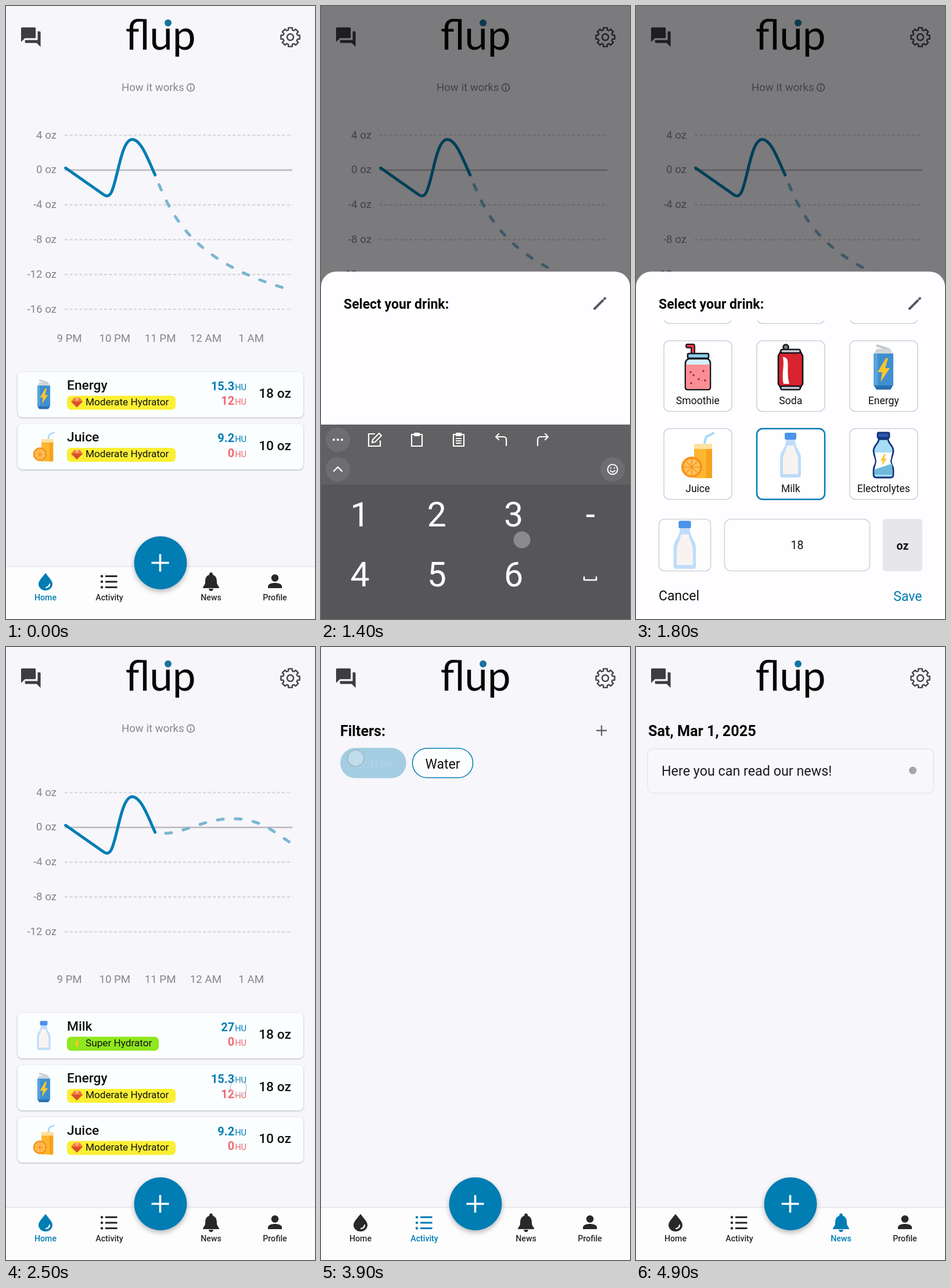
An HTML page that plays this animation: 532 by 1053 pixels, repeating every 5000 ms.

```html
<!DOCTYPE html>
<html lang="en">
<head>
<meta charset="utf-8">
<title>Hydration tracker</title>
<style>
  html, body { margin: 0; width: 100%; height: 100%; overflow: hidden; background: #f7f6fa; }
  svg { display: block; font-family: Roboto, Arial, sans-serif; }
  .shadow { filter: drop-shadow(0 1px 1.5px #0004); }
  .faint { filter: drop-shadow(0 .5px 1px #0003); }
  .lift { filter: drop-shadow(0 4px 4px #0004); }
  .ink { stroke: #15171c; stroke-width: 2.6; stroke-linejoin: round; stroke-linecap: round; }
  .line { fill: none; stroke-linecap: round; stroke-linejoin: round; }
</style>
</head>
<body>
<svg id="stage" width="532" height="1053" viewBox="0 0 532 1053"></svg>
<script>
const BLUE = '#007db3', DARK = '#28282b', GREY = '#858488', RED = '#f0696f';

// SVG helpers
const path = (d, fill, more = '') => `<path d="${d}" fill="${fill}" ${more}/>`;
const line = (d, color, w, more = '') => `<path class="line" d="${d}" stroke="${color}" stroke-width="${w}" ${more}/>`;
const rect = (x, y, w, h, r, fill, more = '') =>
  `<rect x="${x}" y="${y}" width="${w}" height="${h}" rx="${r}" fill="${fill}" ${more}/>`;
const circle = (x, y, r, fill, more = '') => `<circle cx="${x}" cy="${y}" r="${r}" fill="${fill}" ${more}/>`;
const oval = (x, y, rx, ry, fill) => `<ellipse cx="${x}" cy="${y}" rx="${rx}" ry="${ry}" fill="${fill}"/>`;
const text = (x, y, s, size, fill = '#111', more = '') =>
  `<text x="${x}" y="${y}" font-size="${size}" fill="${fill}" ${more}>${s}</text>`;
const at = (x, y, inner, scale = 1, more = '') =>
  `<g transform="translate(${x} ${y}) scale(${scale})" ${more}>${inner}</g>`;
const clip = (x, y, w, h, inner) =>
  `<svg x="${x}" y="${y}" width="${w}" height="${h}" viewBox="${x} ${y} ${w} ${h}">${inner}</svg>`;
const MID = 'text-anchor="middle"', END = 'text-anchor="end"', BOLD = 'font-weight="700"', MEDIUM = 'font-weight="500"';
const INK = 'class="ink"';

// Drink pictures, each about 80 px tall around (0, 0)
const steam = [-9, 0, 9].map(x => line(`M${x} -20c-5 -6 4 -9 0 -17`, '#dcdbe0', 2.2)).join('');
const bolt = path('M4 -16L-10 8H-2L-5 25L11 1H3L8 -16Z', '#fcc52c');
const drinks = {
  Water:
    path('M1 -12H30L25 38H6Z', '#d9f1fd', INK) + path('M3 0H28L24 37H7Z', '#6ab8ec') +
    path('M-19 -29h11c0 6 12 8 12 16v45q0 7 -7 7h-20q-7 0 -7 -7v-45c0 -8 11 -10 11 -16z', '#a9dcf8', INK) +
    rect(-29, -6, 32, 19, 0, '#6ab8ec') + line('M-29 -6H-8M-29 3H3M-29 13H3M-29 23H-10', '#15171c', 2.4) +
    rect(-22, -39, 17, 9, 2, '#3d93d6', INK),
  Coffee:
    steam + oval(-1, 30, 37, 9, '#a58c70') + oval(-2, 27, 25, 6, '#8a7055') +
    line('M22 -2C46 -10 41 18 14 20', '#cfc8bb', 5) +
    path('M-31 -7C-31 15 -22 27 -13 30H7C17 27 25 15 25 -7Z', '#dcd7cd') +
    oval(-3, -8, 28, 8, '#ebe7df') + oval(-3, -7, 24, 6, '#49382f'),
  Tea:
    at(-4, 0, steam, 1.15) + rect(-32, 31, 56, 7, 3.5, '#cc6d37') +
    line('M19 -8C42 -12 36 17 14 15', '#e38a48', 4.5) +
    path('M-32 -12H21C21 13 14 30 2 31H-13C-25 30 -32 13 -32 -12Z', '#fdebd2') +
    rect(-32, -14, 53, 5, 2.5, '#f3cfa3') + line('M-13 -11V9', '#c98c51', 1.6) + path('M-20 12l7 -5l7 5v13h-14z', '#f6a428'),
  Smoothie:
    line('M-17 -37H-8V-19', '#15171c', 8) + line('M-17 -37H-8V-19', '#e4353f', 4) +
    path('M-15 -15H17Q22 -13 22 -7V34q0 4 -4 4H-17q-4 0 -4 -4V-7Q-21 -13 -15 -15Z', '#d5eefb', INK) +
    path('M-20 -5H21V33q0 4 -4 4H-16q-4 0 -4 -4Z', '#fb8d94') + rect(-17, -24, 36, 8, 2, '#8ccdf0', INK) +
    [[-12, 8], [-7, 13], [10, 6], [13, 22], [-11, 27], [2, 20]].map(p => circle(...p, 1.7, '#8d2638')).join(''),
  Soda:
    circle(-8, -35, 4.5, '#777', INK) +
    path('M-16 -29H16L21 -20V28L16 36H-16L-21 28V-20Z', '#d9232e', INK) +
    path('M-13 -18C2 -18 -9 5 -2 28H-12C-16 10 -10 0 -13 -18Z', '#fff') +
    rect(-17, -31, 34, 6, 3, '#c9ced6', INK) + rect(-17, 32, 34, 6, 3, '#c9ced6', INK),
  Energy:
    path('M-12 -38L10 -31', 'none', 'stroke="#c3c7cc" stroke-width="4"') + path('M-12 -32H12L17 -22H-17Z', '#d0d4d9') +
    path('M-17 -24H17V30L12 38H-12L-17 30Z', '#3f8fd1') + rect(-17, -24, 7, 54, 0, '#58a4de') +
    path('M-16 31H16L12 38H-12Z', '#2a6fae') + bolt,
  Juice:
    line('M12 -22L15 -32L27 -38', '#a5d8f8', 4) + rect(-6, -20, 31, 59, 2, '#fdb62f') +
    rect(-6, -20, 31, 9, 2, '#ffe0a0') + rect(15, -11, 10, 50, 0, '#f5a31d') + circle(-10, 20, 18, '#f7941e') +
    circle(-10, 20, 14, '#ffc25c') + line('M-24 20H4M-10 6V34M-20 10L0 30M0 10L-20 30', '#f7941e', 1.6),
  Milk:
    path('M-8 -27H8C8 -10 18 -10 18 6V34q0 4 -4 4H-14q-4 0 -4 -4V6C-18 -10 -8 -10 -8 -27Z', '#bfdcfa') +
    path('M-6 -17H6C8 -5 13 -2 13 8V32H-13V8C-13 -2 -8 -5 -6 -17Z', '#f8f3f1') +
    rect(-10, -39, 20, 12, 3, '#4b93ea'),
  Electrolytes:
    `<g stroke="#16347c" stroke-width="2.8">` +
    path('M-8 -28H8C8 -20 17 -18 17 -8C17 0 13 4 13 10C13 16 17 18 17 25V33q0 5 -5 5H-12q-5 0 -5 -5V25C-17 18 -13 16 -13 10C-13 4 -17 0 -17 -8C-17 -18 -8 -20 -8 -28Z', '#a6dcf5') +
    rect(-10, -39, 20, 9, 2, '#2b57ad') + '</g>' + path('M-15 -5H15L12 10L15 24H-15L-12 10Z', '#fff') +
    path('M-15 24L15 14V33H-15Z', '#6fb8dc') + at(0, 5, bolt, .5),
};

function gear() {
  const pts = [];
  for (let i = 0; i < 8; i++)
    for (const [da, r] of [[-.27, 12.8], [-.2, 16.4], [.2, 16.4], [.27, 12.8]]) {
      const a = i * Math.PI / 4 + da;
      pts.push(`${(r * Math.sin(a)).toFixed(1)} ${(-r * Math.cos(a)).toFixed(1)}`);
    }
  return line(`M${pts.join('L')}Z`, '#454548', 2.4) + circle(0, 0, 5.5, 'none', 'stroke="#454548" stroke-width="2.4"');
}

const header =
  at(22.6, 33.3, path('M21 6h-2v9H6v2c0 .55.45 1 1 1h11l4 4V7c0-.55-.45-1-1-1zM17 12V3c0-.55-.45-1-1-1H3c-.55 0-1 .45-1 1v14l4-4h10c.55 0 1-.45 1-1z', '#3d3d40'), 1.68) +
  text(266, 75, 'flup', 71, '#050505', `${MID} style="font-family:Lato,sans-serif"`) +
  circle(279, 29, 6, '#16759f') + at(489.5, 53.5, gear());

const navIcons = {
  Home: [68, c => path('M0 -15C6 -7 12 -2 12 4A12 11 0 0 1 -12 4C-12 -2 -6 -7 0 -15Z', c) + line('M1 10Q7 9 7 4', '#fff', 2.2)],
  Activity: [178, c => [-9.5, 0, 9.5].map(y => circle(-13, y, 2.2, c) + rect(-7, y - 1.5, 20.5, 3, 0, c)).join('')],
  News: [353, c => path('M0 -16q3 0 3 4C9 -10 10 -5 10 1C10 6 14 7 14 11H-14C-14 7 -10 6 -10 1C-10 -5 -9 -10 -3 -12q0 -4 3 -4ZM-4 12H4Q3 16 0 16Q-3 16 -4 12Z', c)],
  Profile: [463, c => circle(0, -6.5, 6.3, c) + path('M-12 11V8C-12 0 12 0 12 8V11Z', c)],
};

const nav = active =>
  rect(0, 963, 532, 90, 0, '#fdfdfe') + rect(0, 962, 532, 1.5, 0, '#e4e3e7') +
  Object.entries(navIcons).map(([name, [x, icon]]) => {
    const c = name === active ? BLUE : DARK;
    return at(x, 989, icon(c)) + text(x, 1021, name, 14.2, c, `${MID} ${MEDIUM}`);
  }).join('') +
  circle(266, 956.5, 45.4, BLUE, 'class="lift"') + path('M250.5 956.5H280.5M265.5 941.5V971.5', 'none', 'stroke="#fff" stroke-width="3.6"');

// Chart: first grid line, number of lines, measured curve, forecast curve, dash start
const hump = 'M0 0L65 45.5Q74 52 79 41C90 17 96 -49 114.5 -49C129.5 -49 141 -17 154 12';
const decline = 'M0 0L6 4L77 56C107 77 132 91 154 104';
const charts = {
  start: [222, 6, hump, 'M257 290C285 365 325 440 484 486', 18],
  added: [250, 5, hump, 'M257 318C300 330 345 285 413 297C450 303 470 325 496 340', 18],
  final: [250, 5, decline, 'M276 411C310 405 345 339 413 339C450 339 470 361 496 377', 0],
};

function chart([top, rows, past, future, gap]) {
  let s = '';
  for (let i = 0; i < rows; i++) {
    const y = top + i * 59.8;
    s += text(87, y + 5.5, `${4 - 4 * i} oz`, 18.7, GREY, END) +
      (i === 1 ? rect(101, y - 1.2, 392, 2.6, 0, '#bbbabe')
        : path(`M101 ${y}H493`, 'none', 'stroke="#d9d8dc" stroke-width="2.6" stroke-dasharray="5 3.5"'));
  }
  ['9 PM', '10 PM', '11 PM', '12 AM', '1 AM'].forEach((h, i) => s += text(109 + i * 78.3, 577, h, 18.7, GREY, MID));
  return s + at(102.7, top + 56.3, line(past, BLUE, 5)) +
    clip(0, 200, 494, 340, line(future, '#7ab6d1', 5, `stroke-dasharray="10 20.8" stroke-dashoffset="${-gap}"`));
}

const entries = {
  Energy: ['15.3', '12', 18], Juice: ['9.2', '0', 10], Milk: ['27', '0', 18],
};

function card(name, row, dx = 0) {
  const [gain, loss, oz] = entries[name], superb = name === 'Milk';
  const units = (n, y, c) =>
    text(414, y, `<tspan ${BOLD} font-size="20">${n}</tspan><tspan dx="1">HU</tspan>`, 14.6, c, END);
  const gem = superb ? at(122, 51, bolt, .42)
    : path('M112 51L118 44H127L132 51L122 61Z', '#f47b34') + path('M112 51H132L122 61Z', '#d94f2b') + path('M118 44H127L122 51Z', '#ffae72');
  return at(dx, 628.5 + row * 89.5,
    rect(20, 0, 492, 78, 8, '#fafeff', 'class="shadow"') + at(65, 39, drinks[name], .65) +
    text(105, 30, name, 22.8, '#111', MEDIUM) +
    rect(105, 41, superb ? 158 : 187, 24, 7, superb ? '#8fe71d' : '#faef34') + gem +
    text(137, 57, superb ? 'Super Hydrator' : 'Moderate Hydrator', 17.2) +
    units(gain, 31, BLUE) + units(loss, 56.5, RED) + text(491, 44.5, `${oz} oz`, 22.8, '#111', `${MEDIUM} ${END}`));
}

function home(t) {
  let cards;
  if (t < 2200) cards = card('Energy', 0) + card('Juice', 1);
  else {
    const swipe = t < 2600 ? 0 : -60 * ((t - 2500) / 100) ** 2;
    const rise = Math.min(1, Math.max(0, (t - 2800) / 200));
    cards = card('Milk', 0) + (t < 2900 ? card('Energy', 1, swipe) : '') + card('Juice', 2 - rise);
  }
  return text(199, 146, 'How it works', 18.6, '#88878b') +
    circle(318, 140, 6.4, 'none', 'stroke="#77767a" stroke-width="1.5"') + path('M318 139V144M318 136V137.6', 'none', 'stroke="#77767a" stroke-width="1.6"') +
    chart(charts[t < 2200 ? 'start' : t < 3100 ? 'added' : 'final']) + clip(17, 620, 498, 320, cards) + nav('Home');
}

function activity(t) {
  const pill = (x, w, name, on, opacity = 1) =>
    rect(x, 174, w, 50.5, 25, on ? BLUE : '#fcfdfe', `stroke="${BLUE}" stroke-width="1.5" opacity="${opacity}"`) +
    text(x + w / 2, 208.5, name, 23, on ? '#fff' : '#111', `${MID} opacity="${opacity ** 2}"`);
  return text(33, 153, 'Filters:', 25, '#050505', BOLD) +
    path('M474 143.5H492M483 134.5V152.5', 'none', 'stroke="#66656a" stroke-width="2.3"') +
    pill(34, 112, 'Coffee', t >= 3900, t === 3900 ? .33 : 1) + pill(157.5, 104, 'Water') + nav('Activity');
}

const news = () =>
  text(21, 153, 'Sat, Mar 1, 2025', 25.2, '#050505', BOLD) +
  rect(20.5, 175.5, 491, 75, 9, '#f8f7fb', 'class="faint"') + text(44, 221, 'Here you can read our news!', 23.3, '#1b1b1e') +
  circle(476.5, 212, 6.5, '#a5a4a8') + nav('News');

function sheet(t) {
  const typing = t === 1500 || t === 1600;
  const top = typing ? 0 : 457, lift = typing ? -514 : 0;
  const scroll = { 900: 80 }[t] ?? (t > 900 ? 130 : 0);
  const picked = t < 1200 ? 'Water' : 'Milk';
  const amount = t < 1500 ? 17 : t === 1500 ? 1 : 18;
  const frame = 'stroke="#d2d1d6" stroke-width="1.6"';
  let tiles = '';
  Object.entries(drinks).forEach(([name, art], i) => {
    const x = 48 + i % 3 * 160, y = top + 97 + Math.floor(i / 3) * 151 - scroll, on = name === picked;
    const pressed = (name === 'Soda' && t === 800) || (name === 'Milk' && t === 1100);
    tiles += `<g opacity="${pressed ? .22 : 1}">` +
      rect(x, y, 117, 121.5, 10, '#fffeff', on ? `stroke="${BLUE}" stroke-width="2.5"` : frame) +
      at(x + 58, y + 46, art) + text(x + 58.3, y + 109, name, 17.6, '#111', MID) + '</g>';
  });
  const footer =
    rect(39.5, 881.5, 89, 89, 9, '#fffeff', frame) + at(84, 926, drinks[picked], 1.07) +
    rect(152.5, 881.5, 250, 89, 11, '#fffeff', frame) + text(277.5, 933, amount, 19.5, '#111', MID) +
    rect(425, 881, 68, 90, 5, '#e7e6ea') + text(459, 933.5, 'oz', 19.5, '#111', `${BOLD} ${MID}`) +
    text(39, 1021, 'Cancel', 23) + text(492.5, 1021.5, 'Save', 23, BLUE, `${END} opacity="${t === 2000 ? .3 : 1}"`);
  return rect(0, top - .7, 532, 640, 26, '#fefdff') + text(39, top + 63, 'Select your drink:', 23, '#050505', BOLD) +
    line(`M471 ${top + 63}L485 ${top + 49}`, '#59585c', 4) + line(`M488 ${top + 46}L489 ${top + 45}`, '#59585c', 4) +
    (t === 1400 || t === 1700 ? '' : clip(0, top + 83, 532, 321 + lift + 457 - top, tiles) + at(0, lift, footer));
}

function keyboard(y) {
  const tool = (x, d) => at(x, 26, line(d, '#fff', 2.2));
  const board = 'M-9 -9H9V11H-9ZM-4 -11H4V-7H-4Z';
  const keys = ['1', '2', '3', '-', '4', '5', '6', '', '7', '8', '9', '⌫', ',', '0', '.', '↵'];
  return at(0, y,
    rect(0, 0, 532, 104, 0, '#616063') + rect(0, 103, 532, 420, 0, '#565559') +
    [[29, 26], [29, 77], [502, 77]].map(p => circle(...p, 21, '#6e6d71')).join('') +
    [22, 29, 36].map(x => circle(x, 26, 2, '#fff')).join('') + line('M22 80L29 73L36 80', '#fff', 2.4) +
    circle(502, 77, 8.5, 'none', 'stroke="#fff" stroke-width="2"') + line('M498 79Q502 84 506 79M499 74V75M505 74V75', '#fff', 1.8) +
    tool(92, 'M0 -10H-10V11H10V2M-4 5L-3 0L8 -11L12 -7L1 4Z') + tool(165, board) +
    tool(237, board + 'M-4 -2H4M-4 2H4M-4 6H4') + tool(310, 'M-4 -10L-9 -5L-4 0M-9 -5H4Q9 -5 9 0V10') +
    tool(382, 'M4 -10L9 -5L4 0M9 -5H-4Q-9 -5 -9 0V10') + line('M453 262V267H474V262', '#fff', 2.6) +
    keys.map((k, i) => text(67 + i % 4 * 132.3, 175 + Math.floor(i / 4) * 103, k, 59, '#fff', MID)).join(''));
}

// Finger positions by time
const touches = {
  100: [266, 956], 200: [266, 956], 700: [199, 775], 800: [198, 721], 900: [198, 640], 1100: [272, 790],
  1300: [346, 917], 1400: [346, 917], 1900: [468, 1013], 2500: [400, 757], 2600: [340, 757], 2700: [180, 757],
  3300: [178, 990], 3800: [60, 191], 3900: [60, 191], 4200: [353, 990],
};

// Sheet offset while it opens and closes
const slides = { 300: 400, 400: 150, 500: 40, 2100: 130, 2200: 380 };

function scene(t) {
  let s = rect(0, 0, 532, 1053, 0, '#f7f6fa') + header + (t < 3400 ? home(t) : t < 4300 ? activity(t) : news());
  if (t >= 300 && t < 2300) {
    const offset = slides[t] || 0;
    s += rect(0, 0, 532, 1053, 0, '#000', `opacity="${.5 * (1 - offset / 600)}"`) + at(0, offset, sheet(t));
  }
  if (t >= 1400 && t <= 1700) s += keyboard(t === 1400 ? 719 : t === 1700 ? 800 : 539);
  if (touches[t]) s += circle(...touches[t], 14, '#ffffff50', 'stroke="#8e99a566" stroke-width="2"');
  return s;
}

const stage = document.getElementById('stage');
let shown = -1;
function tick() {
  const t = Math.floor(performance.now() % 5000 / 100) * 100;
  if (t !== shown) stage.innerHTML = scene(shown = t);
  requestAnimationFrame(tick);
}
tick();
</script>
</body>
</html>
```
